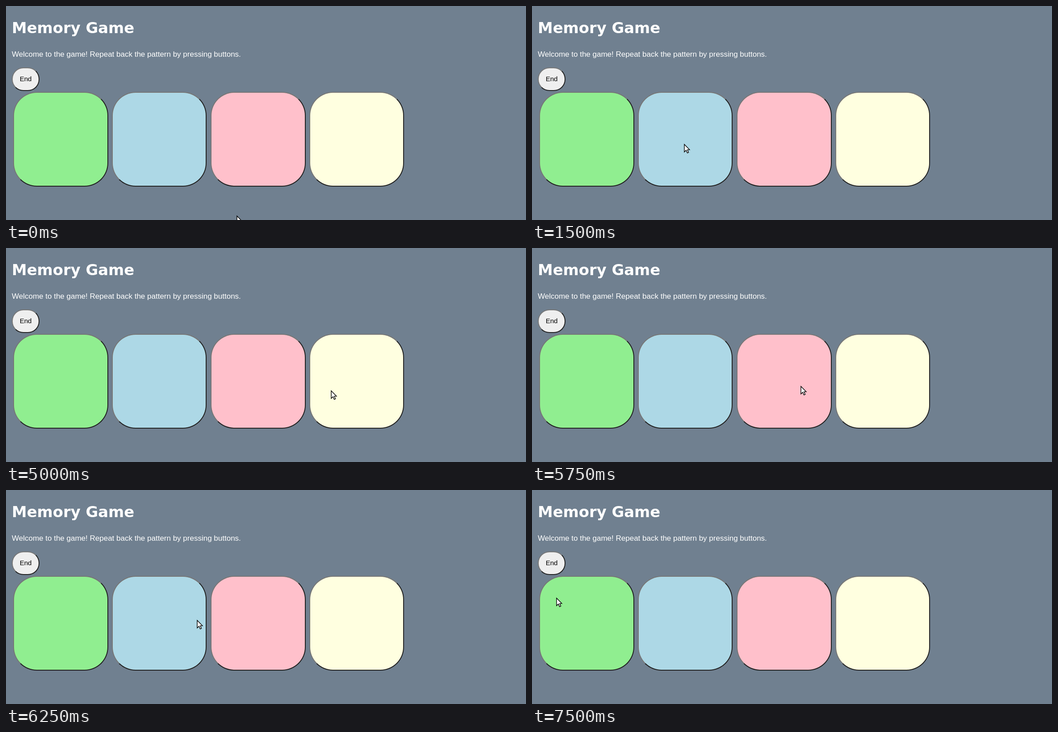
Recreate the animation shown at these times as an HTML page. Size 1164 by 481 pixels, loop 8 s.

```html
<!DOCTYPE html>
<html lang="en">
<head>
<meta charset="utf-8">
<title>Memory Game</title>
<style>
  html, body { margin: 0; width: 100%; height: 100%; overflow: hidden; background: slategray; }
  .button {
    --light: #767676;
    --dark: #212121;
    position: absolute;
    box-sizing: border-box;
    border: 2px solid;
    border-color: var(--light) var(--dark) var(--dark) var(--light);
  }
  .pressed { border-color: var(--dark) var(--light) var(--light) var(--dark); }
  .pad { top: 193px; height: 213px; border-radius: 53px; }
  #end { left: 13px; top: 138px; width: 62px; height: 53px; border-radius: 26px; background: #efefef; }
  svg { position: absolute; left: 0; top: 0; }
  text { font-family: "Liberation Sans", Arial, sans-serif; fill: #fff; }
  #title { font: bold 33.8px "DejaVu Sans", Verdana, sans-serif; }
</style>
</head>
<body>
<div class="button" id="end"></div>
<svg width="1164" height="481">
  <text id="title" x="13" y="61">Memory Game</text>
  <text x="13" y="114" font-size="17">Welcome to the game! Repeat back the pattern by pressing buttons.</text>
  <text x="44" y="169" font-size="15" text-anchor="middle" style="fill:#000">End</text>
</svg>
<script>
const LOOP = 8000;
const TICK = 250;

const pads = [
  { rest: 'lightgreen' },
  { rest: 'lightblue', lit: 'blue', pressAt: 4750 },
  { rest: 'pink', lit: 'red', pressAt: 6000 },
  { rest: 'lightyellow' }
];

// Places the pointer rests at; it glides to each one and arrives at the given time.
const stops = [
  { arrive: 0, x: 516, y: 471 },
  { arrive: 500, x: 359, y: 350, travel: 2 * TICK },
  { arrive: 1500, x: 340, y: 310 },
  { arrive: 5000, x: 727, y: 320 },
  { arrive: 5250, x: 820, y: 332 },
  { arrive: 5750, x: 601, y: 310 },
  { arrive: 6250, x: 427, y: 292 },
  { arrive: 6500, x: 345, y: 288 },
  { arrive: 7000, x: 54, y: 242 }
];

const easeOut = p => 1 - (1 - p) ** 2.3;
const clamp = p => Math.min(1, Math.max(0, p));

function pointerAt(time) {
  let { x, y } = stops[0];
  for (const { arrive, x: toX, y: toY, travel = TICK } of stops) {
    const progress = easeOut(clamp((time - arrive) / travel + 1));
    x += (toX - x) * progress;
    y += (toY - y) * progress;
  }
  return `translate(${x} ${y})`;
}

pads.forEach((pad, i) => {
  pad.el = document.createElement('div');
  pad.el.className = 'button pad';
  pad.el.style.left = 16 + 221 * i + 'px';
  pad.el.style.width = 213 - i % 2 + 'px';
  document.body.append(pad.el);
});

// The pointer layer comes last so that it lies over the pads.
document.body.insertAdjacentHTML('beforeend', `
  <svg width="1164" height="481">
    <path id="pointer" fill="#fff" stroke="#000" stroke-width="1.4"
      d="M1 1V18L5 14.2 7.7 20.3 10.5 19.1 7.9 13.1H12.8Z"/>
  </svg>`);
const pointer = document.getElementById('pointer');

function draw(time) {
  pointer.setAttribute('transform', pointerAt(time));
  for (const { el, rest, lit, pressAt } of pads) {
    const down = time === pressAt;
    el.classList.toggle('pressed', down);
    el.style.background = down ? lit : rest;
  }
}

// The picture changes in steps of one tick.
const origin = performance.now();
function frame() {
  const time = (performance.now() - origin) % LOOP;
  draw(Math.floor(time / TICK) * TICK);
  requestAnimationFrame(frame);
}
frame();
</script>
</body>
</html>
```
